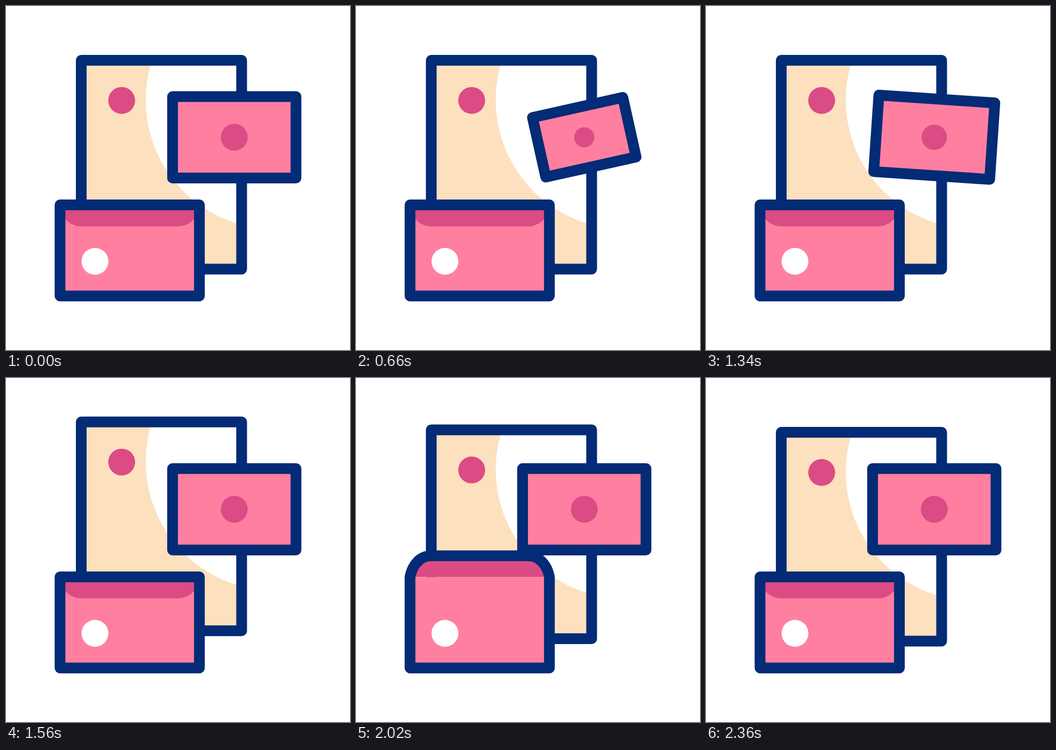
Animation, 640 px wide and 640 px high, one loop 2.4 s. Source, as an HTML page:

```html
<!DOCTYPE html>
<html lang="en">
<head>
<meta charset="utf-8">
<title>Poster, card and envelope</title>
<style>
  html, body { margin: 0; width: 100%; height: 100%; overflow: hidden; background: #fff; }
  svg { display: block; width: 100vw; height: 100vh; }
  .line { stroke: #032b76; stroke-width: 20; stroke-linejoin: round; }
  .pink { fill: #ff7fa1; }
  .dark { fill: #db4b84; }
</style>
</head>
<body>
<svg viewBox="0 0 640 640">
  <clipPath id="sheet"><rect x="140" y="101" width="298.4" height="388.5"/></clipPath>
  <g id="poster">
    <g clip-path="url(#sheet)">
      <rect x="140" y="101" width="298.4" height="388.5" fill="#fde0be"/>
      <circle cx="500" cy="175" r="240" fill="#fff"/>
    </g>
    <circle class="dark" cx="215.2" cy="175.7" r="25"/>
    <rect class="line" x="140" y="101" width="298.4" height="388.5" fill="none"/>
  </g>
  <g id="envelope">
    <rect class="pink" x="100.5" y="370.2" width="259.3" height="169.3"/>
    <path id="flap" class="dark"/>
    <path id="outline" class="line" fill="none"/>
    <circle cx="165.5" cy="475" r="25" fill="#fff"/>
  </g>
  <g id="card">
    <rect id="cardFace" class="line pink"/>
    <circle id="cardDot" class="dark"/>
  </g>
</svg>
<script>
const LOOP = 2400;
const $ = id => document.getElementById(id);
const set = (id, attrs) => {
  for (const name in attrs) $(id).setAttribute(name, attrs[name]);
};

// Each track is a list of [time in ms, value] joined by straight ramps.
const tracks = {
  turn: [[215, 0], [625, -15.2], [1035, 15.2], [1445, 0]],
  scale: [[215, 1], [830, 0.655], [1445, 1]],
  lift: [[1412, 0], [1710, -38.6], [2000, 0], [2175, -38.5], [2358, 0]],
  fold: [[1650, 40], [1976, -39.2], [2177, -39.2], [2358, 40]]
};

function valueAt(track, t) {
  if (t <= track[0][0]) return track[0][1];
  for (let i = 1; i < track.length; i++) {
    const [t0, v0] = track[i - 1], [t1, v1] = track[i];
    if (t < t1) return v0 + (v1 - v0) * (t - t0) / (t1 - t0);
  }
  return track[track.length - 1][1];
}

// Flap edge from the left to the right corner; positive depth hangs down.
function flapEdge(depth) {
  const left = 100.5, right = 359.8, top = 370, r = 40;
  const lean = depth < 0 ? 4 : 0;
  const tip = top + depth, side = top + depth * 0.55;
  return `M${left} ${top}C${left + lean} ${side} ${left + r * 0.45} ${tip} ${left + r} ${tip}` +
    `H${right - r}C${right - r * 0.45} ${tip} ${right - lean} ${side} ${right} ${top}`;
}

function draw(t) {
  const scale = valueAt(tracks.scale, t);
  const fold = valueAt(tracks.fold, t);
  const w = 229.6 * scale, h = 151.4 * scale;

  set('poster', { transform: `translate(0 ${valueAt(tracks.lift, t)})` });
  set('card', { transform: `translate(424.7 244.2) rotate(${valueAt(tracks.turn, t)})` });
  set('cardFace', { x: -w / 2, y: -h / 2, width: w, height: h });
  set('cardDot', { r: 25 * scale });
  set('flap', { d: flapEdge(fold) + 'Z' });
  set('outline', { d: flapEdge(Math.min(fold, 0)) + 'V539.5H100.5Z' });
}

const start = performance.now();
function tick() {
  draw((performance.now() - start) % LOOP);
  requestAnimationFrame(tick);
}
draw(0);
requestAnimationFrame(tick);
</script>
</body>
</html>
```
